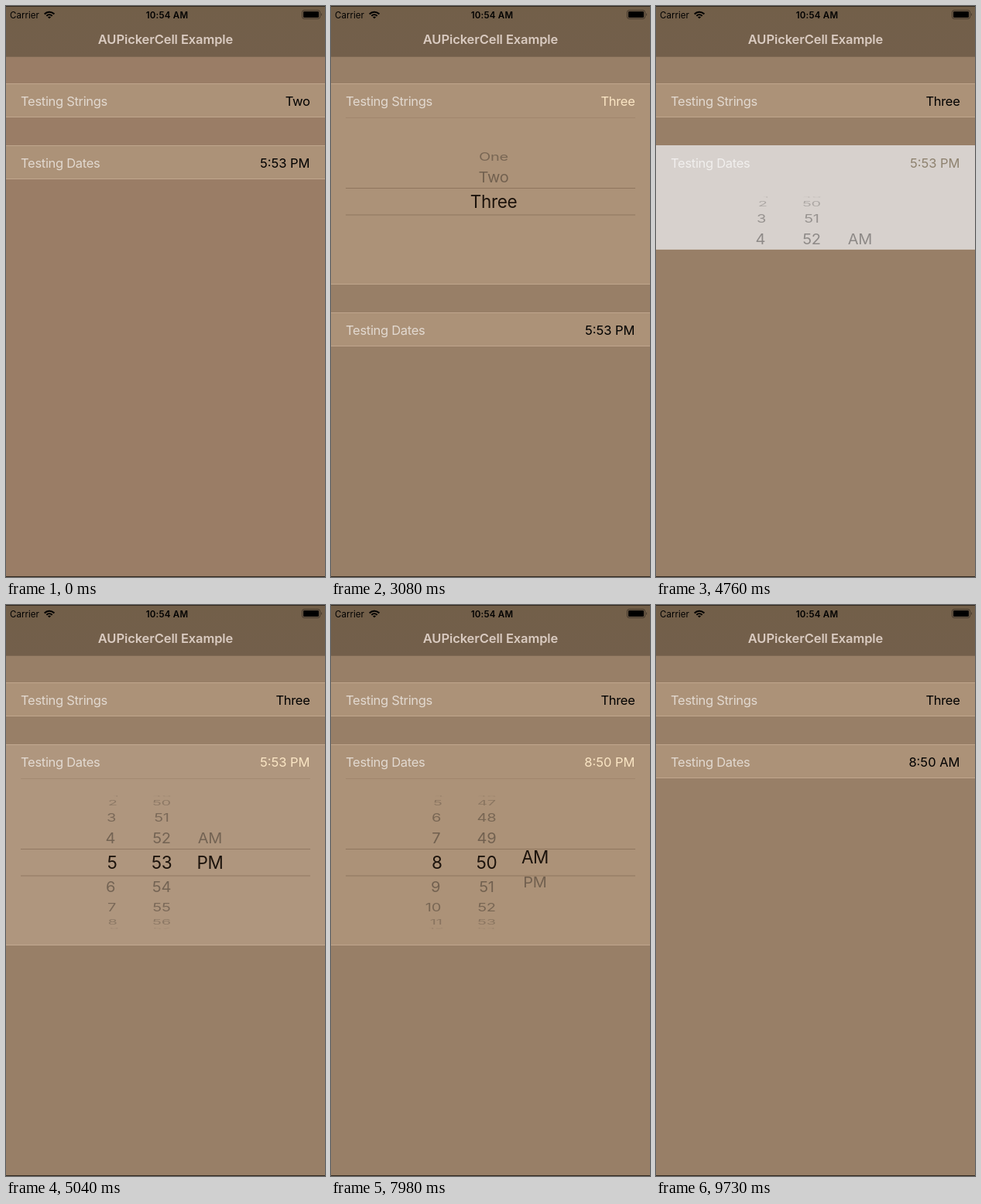
Write an HTML page with a canvas that moves like this. It is 412 by 738 pixels and loops after 9.8 s.

```html
<!DOCTYPE html>
<html lang="en">
<head>
<meta charset="utf-8">
<title>Picker cells</title>
<style>
  html, body { margin: 0; width: 100%; height: 100%; overflow: hidden; background: #987f67; }
  canvas { display: block; width: 412px; height: 738px; }
</style>
</head>
<body>
<canvas id="stage" width="412" height="738"></canvas>
<script>
const ctx = document.getElementById('stage').getContext('2d');
const LOOP = 9800, STEP = 70, PICKER_HEIGHT = 216, CELL_HEIGHT = 44;
const WHEEL_RADIUS = 86, ROW_ANGLE = 0.372, BAND = 17;
const CAP_HALF = 0.3635;
const FIRST_TAP = 350;

const clamp = v => Math.max(0, Math.min(1, v));
const smooth = v => (v = clamp(v), v * v * (3 - 2 * v));
const glide = (t, start, duration) => 1 - (1 - clamp((t - start) / duration)) ** 2.4;

function rect(x, y, w, h, color) {
  ctx.fillStyle = color;
  ctx.fillRect(x, y, w, h);
}

// Text is centred vertically on its capital letters.
function text(str, x, y, { size = 16.5, weight = 400, align = 'left', color = '#000', spacing = -0.3, squash = 1 } = {}) {
  ctx.save();
  ctx.translate(x, y);
  ctx.scale(1, squash);
  ctx.font = `${weight} ${size}px Inter, sans-serif`;
  ctx.letterSpacing = spacing + 'px';
  ctx.textAlign = align;
  ctx.fillStyle = color;
  ctx.fillText(str, 0, size * CAP_HALF);
  ctx.restore();
}

function clipped(x, y, w, h, draw) {
  ctx.save();
  ctx.beginPath();
  ctx.rect(x, y, w, h);
  ctx.clip();
  draw();
  ctx.restore();
}

function drawWheel(cy, { x, align = 'center', index, label }) {
  const rows = [];
  for (let i = Math.ceil(index - 4.2); i <= index + 4.2; i++) {
    if (label(i)) rows.push({ str: label(i), d: i - index });
  }
  const outer = () => {
    for (const { str, d } of rows) {
      const angle = d * ROW_ANGLE, squash = Math.cos(angle);
      if (squash < 0.02) continue;
      const bend = align === 'right' ? 0.3 * d * d : 0;
      const alpha = 0.34 * Math.min(1, 0.15 + squash);
      text(str, x + bend, cy + WHEEL_RADIUS * Math.sin(angle),
        { size: 20, align, spacing: -0.2, squash, color: `rgba(0,0,0,${alpha})` });
    }
  };
  clipped(0, cy - 110, 412, 110 - BAND, outer);
  clipped(0, cy + BAND, 412, 110 - BAND, outer);
  clipped(0, cy - BAND, 412, 2 * BAND, () => {
    for (const { str, d } of rows) {
      if (Math.abs(d) > 1.2) continue;
      text(str, x + (align === 'right' ? 2.5 : 0), cy + 1.1 * WHEEL_RADIUS * Math.sin(d * ROW_ANGLE),
        { size: 22.5, align, spacing: -0.3, color: '#1c130c' });
    }
  });
}

function drawCell(t, top, { title, detail, detailSpacing, open, close, linesDelay, wheels }) {
  const growth = smooth((t - open - 6) / 300) - smooth((t - close - 6) / 300);
  const height = CELL_HEIGHT + PICKER_HEIGHT * growth;
  const tapped = t >= close ? close : open;
  const highlight = t < tapped ? 0 : 1 - smooth((t - tapped - 140) / 330);

  rect(0, top, 412, height, '#ac9278');
  rect(0, top, 412, 1, '#c0a68d');
  rect(0, top + height - 1, 412, 1, '#c0a68d');
  rect(0, top, 412, height, `rgba(215,209,205,${highlight})`);

  clipped(0, top, 412, height, () => {
    const middle = top + 22.8;
    const tint = [250, 229, 196].map(c => Math.round(c * clamp(growth * 1.35)));
    text(title, 19, middle, { color: 'rgba(255,255,255,.65)' });
    text(detail, 392.5, middle, { align: 'right', color: `rgb(${tint})`, spacing: detailSpacing });
    if (growth <= 0) return;
    const cy = top + 152.7;
    wheels.forEach(wheel => drawWheel(cy, wheel));
    if (t >= open + linesDelay && t < close) {
      rect(19, top + 44, 374, 1, 'rgba(90,60,35,.13)');
      rect(19, top + 135, 374, 1, 'rgba(70,45,25,.28)');
      rect(19, top + 169.5, 374, 1, 'rgba(70,45,25,.28)');
    }
  });
  return height;
}

function drawWifi(x, y) {
  ctx.strokeStyle = '#000';
  ctx.lineWidth = 2.1;
  for (const r of [5, 8.6]) {
    ctx.beginPath();
    ctx.arc(x, y, r, -Math.PI * 0.76, -Math.PI * 0.24);
    ctx.stroke();
  }
  ctx.fillStyle = '#000';
  ctx.beginPath();
  ctx.moveTo(x, y);
  ctx.arc(x, y, 2.7, -Math.PI * 0.76, -Math.PI * 0.24);
  ctx.fill();
}

function drawBars() {
  const shade = ctx.createLinearGradient(0, 0, 0, 66);
  shade.addColorStop(0, '#725f49');
  shade.addColorStop(1, '#735f4b');
  rect(0, 0, 412, 66, shade);
  rect(0, 65, 412, 1, '#7d6752');
  rect(0, 0, 412, 1, '#33291f');
  rect(0, 737, 412, 1, '#33291f');

  text('Carrier', 5, 11.5, { size: 11.5, spacing: 0.05 });
  drawWifi(56, 16.3);
  text('10:54 AM', 208, 11.5, { size: 11.5, weight: 600, align: 'center', spacing: 0.25 });
  ctx.lineWidth = 1;
  ctx.strokeStyle = 'rgba(0,0,0,.4)';
  ctx.beginPath();
  ctx.roundRect(382.5, 5.5, 23, 11, 2.5);
  ctx.stroke();
  ctx.fillStyle = '#000';
  ctx.beginPath();
  ctx.roundRect(384, 7, 20, 8, 1.2);
  ctx.fill();
  rect(407, 9.5, 1, 3, 'rgba(0,0,0,.4)');

  text('AUPickerCell Example', 206, 43.3, { weight: 600, align: 'center', spacing: -0.1, color: '#dacbc1' });
}

function draw(t) {
  rect(0, 0, 412, 738, t < FIRST_TAP ? '#9a7d66' : '#987f67');
  const hour = t < 7000 ? 5 : 8;
  const minute = t < 6160 ? 53 : 50;
  const half = t < 8400 ? 'PM' : 'AM';

  const firstHeight = drawCell(t, 100, {
    title: 'Testing Strings',
    detail: t < 2310 ? 'Two' : 'Three',
    open: FIRST_TAP, close: 3500, linesDelay: 490,
    wheels: [
      { x: 210, index: 1 + smooth((t - 1200) / 1040), label: i => ['One', 'Two', 'Three'][i] }
    ]
  });
  drawCell(t, 136 + firstHeight, {
    title: 'Testing Dates',
    detail: `${hour}:${minute} ${half}`,
    detailSpacing: 0,
    open: 4620, close: 8960, linesDelay: 280,
    wheels: [
      { x: 141, align: 'right', index: 5 + 3 * glide(t, 6680, 320), label: i => String((i + 11) % 12 + 1) },
      { x: 201, index: 53 - 3 * glide(t, 5490, 670), label: i => String(i % 60).padStart(2, '0') },
      { x: 263.5, index: 1 - glide(t, 7590, 770), label: i => ['AM', 'PM'][i] }
    ]
  });
  drawBars();
}

const start = performance.now();
function tick() {
  const t = (performance.now() - start) % LOOP;
  draw(Math.floor(t / STEP) * STEP);
  requestAnimationFrame(tick);
}
tick();
</script>
</body>
</html>
```
